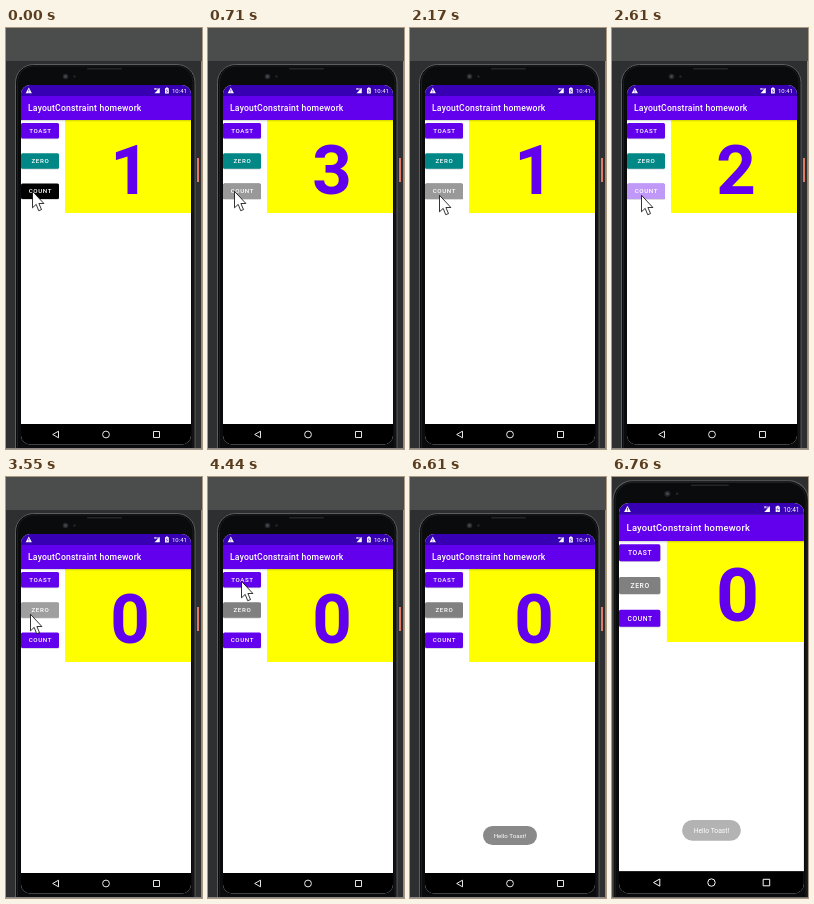
Write an HTML page that moves like this. It is 196 px wide and 421 px high and loops after 6860 ms.

```html
<!DOCTYPE html>
<html lang="en">
<head>
<meta charset="utf-8">
<title>Counter app demo</title>
<style>
  html, body { margin: 0; width: 100%; height: 100%; overflow: hidden; background: #2e2f30; }
  svg { display: block; width: 100%; height: 100%; }
  text { font-family: Roboto, "Noto Sans", sans-serif; fill: #fff; }
  .title { font-size: 8.6px; font-weight: 500; letter-spacing: .2px; }
  .label { font-size: 6.2px; font-weight: 500; letter-spacing: .58px; text-anchor: middle; }
  #number { font-size: 69px; font-weight: 700; text-anchor: middle; fill: #6200ee; }
</style>
</head>
<body>
<svg viewBox="0 0 196 421">
  <defs>
    <linearGradient id="shade" x2="0" y2="1">
      <stop offset="0" stop-color="#000" stop-opacity=".18"/>
      <stop offset="1" stop-color="#000" stop-opacity="0"/>
    </linearGradient>
    <clipPath id="screen"><rect x="15" y="57" width="170" height="359.5" rx="9"/></clipPath>
  </defs>
  <g id="scene">
    <!-- desktop and phone body -->
    <rect width="196" height="440" fill="#2e2f30"/>
    <rect width="196" height="33" fill="#4a4d4c"/>
    <rect x="195" y="33" width="1" height="388" fill="#8a8a8a"/>
    <rect x="191" y="130" width="2" height="24" fill="#e07a68"/>
    <rect x="9.5" y="36.5" width="179.5" height="410" rx="18" fill="#0a0b0c" stroke="#5c5e5f"/>
    <rect x="11.5" y="38" width="175.5" height="408" rx="16.5" fill="none" stroke="#1c1d1e"/>
    <rect x="81" y="40" width="35" height="1.4" rx=".7" fill="#242627"/>
    <circle cx="59.5" cy="48.5" r="2.8" fill="#24272b"/>
    <circle cx="59.5" cy="48.5" r="1.2" fill="#4a4f57"/>
    <circle cx="68.5" cy="48.5" r="1.2" fill="#24272b"/>

    <g clip-path="url(#screen)">
      <rect x="15" y="57" width="170" height="360" fill="#fff"/>
      <rect x="59" y="92" width="126" height="93" fill="#ff0"/>
      <rect x="15" y="92" width="170" height="2" fill="url(#shade)"/>
      <rect x="15" y="57" width="170" height="11" fill="#3700b3"/>
      <rect x="15" y="68" width="170" height="24" fill="#6200ee"/>
      <rect x="15" y="396" width="170" height="21" fill="#000"/>
    </g>
    <text class="title" x="22" y="83.2">LayoutConstraint homework</text>

    <!-- status icons -->
    <path d="M22.8 59.6l3.1 5.6h-6.2z" fill="#fff"/>
    <path d="M22.8 61.5v1.8m0 .5v.7" stroke="#3700b3" stroke-width=".7"/>
    <path d="M148.5 60h5.2v5.2z" fill="#fff" fill-opacity=".4"/>
    <path d="M153.7 60v5.2h-5.2z" fill="#fff"/>
    <path d="M148.2 60l2 2m0-2l-2 2" stroke="#fff" stroke-width=".6"/>
    <path d="M159 60.2h1v-.7h1.8v.7h1v5.2h-3.8z" fill="#fff"/>
    <path d="M161.2 61l-1.2 2h1.8l-1.2 1.8" fill="none" stroke="#3700b3" stroke-width=".5"/>
    <text x="166" y="65" font-size="6">10:41</text>

    <text id="number" x="124" y="166"></text>
    <g id="buttons"></g>

    <g id="toast">
      <rect x="73" y="349" width="54" height="19" rx="9.5" fill="#616161"/>
      <text x="100" y="360.8" font-size="6.2" text-anchor="middle">Hello Toast!</text>
    </g>

    <!-- navigation icons -->
    <g fill="none" stroke="#fff" stroke-width=".9" stroke-linejoin="round">
      <path d="M52.5 403.2v6.6l-5.8-3.3z"/>
      <circle cx="100" cy="406.5" r="3.4"/>
      <rect x="147.5" y="403.5" width="6" height="6"/>
    </g>
    <rect y="420" width="196" height="1" fill="#8a8a8a"/>

    <path id="cursor" d="M0 .3v16.5l3.7-3.4 2.5 6.3 2.8-1.1-2.6-6.1h5z" fill="#fff" stroke="#000" stroke-width=".8" stroke-linejoin="round"/>
  </g>
</svg>
<script>
const LOOP = 6860, ZOOM_AT = 6760, BEAT = 132;
const TOAST_IN = 4560, TOAST_OUT = 6610, CURSOR_GONE = 5770;
const PURPLE = '#6200ee';
const el = id => document.getElementById(id);

const presses = { TOAST: [4560], ZERO: [1370, 3550], COUNT: [310, 590, 2040, 2610, 2760] };
const home = [26.5, 163];
const moves = [
  { at: 840, steps: 2, to: [24.5, 137] },
  { at: 1650, steps: 1, to: [29.5, 167] },
  { at: 2890, steps: 3, to: [24.5, 137] },
  { at: 3800, steps: 3, to: [33.5, 104] },
  { at: 5640, steps: 1, to: [77, 267] }
];

const beats = (t, start) => t < start ? 0 : 1 + Math.floor((t - start) / BEAT);
const lastBefore = (times, t) => times.filter(s => s <= t).pop() ?? -Infinity;

function countAt(t) {
  const reset = lastBefore(presses.ZERO, t);
  const added = presses.COUNT.filter(s => s > reset && s <= t).length;
  return added + (reset < 0 ? 1 : 0);
}

function pointerAt(t) {
  return moves.reduce((pos, { at, steps, to }) => {
    const p = Math.min(beats(t, at) / steps, 1);
    return pos.map((v, i) => v + (to[i] - v) * p);
  }, home);
}

// A press flashes white and loses most of its strength every beat.
function flashAt(name, peak, t) {
  const age = beats(t, lastBefore(presses[name], t));
  return age > 3 ? 0 : peak * .35 ** (age - 1);
}

function toastAt(t) {
  const shown = Math.min(beats(t, TOAST_IN) / 4, 1);
  return shown - .26 * beats(t, TOAST_OUT);
}

const buttons = [
  { name: 'TOAST', peak: .24, color: () => PURPLE },
  { name: 'ZERO', peak: .24, color: n => n ? '#018786' : '#808080' },
  { name: 'COUNT', peak: .6, color: n => n % 2 ? '#000' : PURPLE }
];

buttons.forEach((button, i) => {
  const y = 95 + 30.2 * i;
  const box = (dy, look) =>
    `<rect x="15" y="${y + dy}" width="38" height="15.6" rx="1.5" ${look}/>`;
  el('buttons').insertAdjacentHTML('beforeend', `<g>
    ${box(.7, 'opacity=".18"')}${box(0, '')}${box(0, 'fill="#fff"')}
    <text class="label" x="34.4" y="${y + 10}">${button.name}</text></g>`);
  [, button.face, button.flash] = el('buttons').lastElementChild.children;
});

function draw(t) {
  const n = countAt(t);
  for (const { name, peak, color, face, flash } of buttons) {
    face.setAttribute('fill', color(n));
    flash.setAttribute('opacity', flashAt(name, peak, t));
  }
  el('number').textContent = n;
  el('toast').setAttribute('opacity', toastAt(t));
  el('cursor').setAttribute('visibility', t < CURSOR_GONE ? 'visible' : 'hidden');
  el('cursor').setAttribute('transform', `translate(${pointerAt(t)})`);
  el('scene').setAttribute('transform',
    t >= ZOOM_AT ? 'translate(7 64) scale(1.088 1.086) translate(-15 -92)' : '');
}

const begin = performance.now();
function tick() {
  draw((performance.now() - begin) % LOOP);
  requestAnimationFrame(tick);
}
tick();
</script>
</body>
</html>
```
